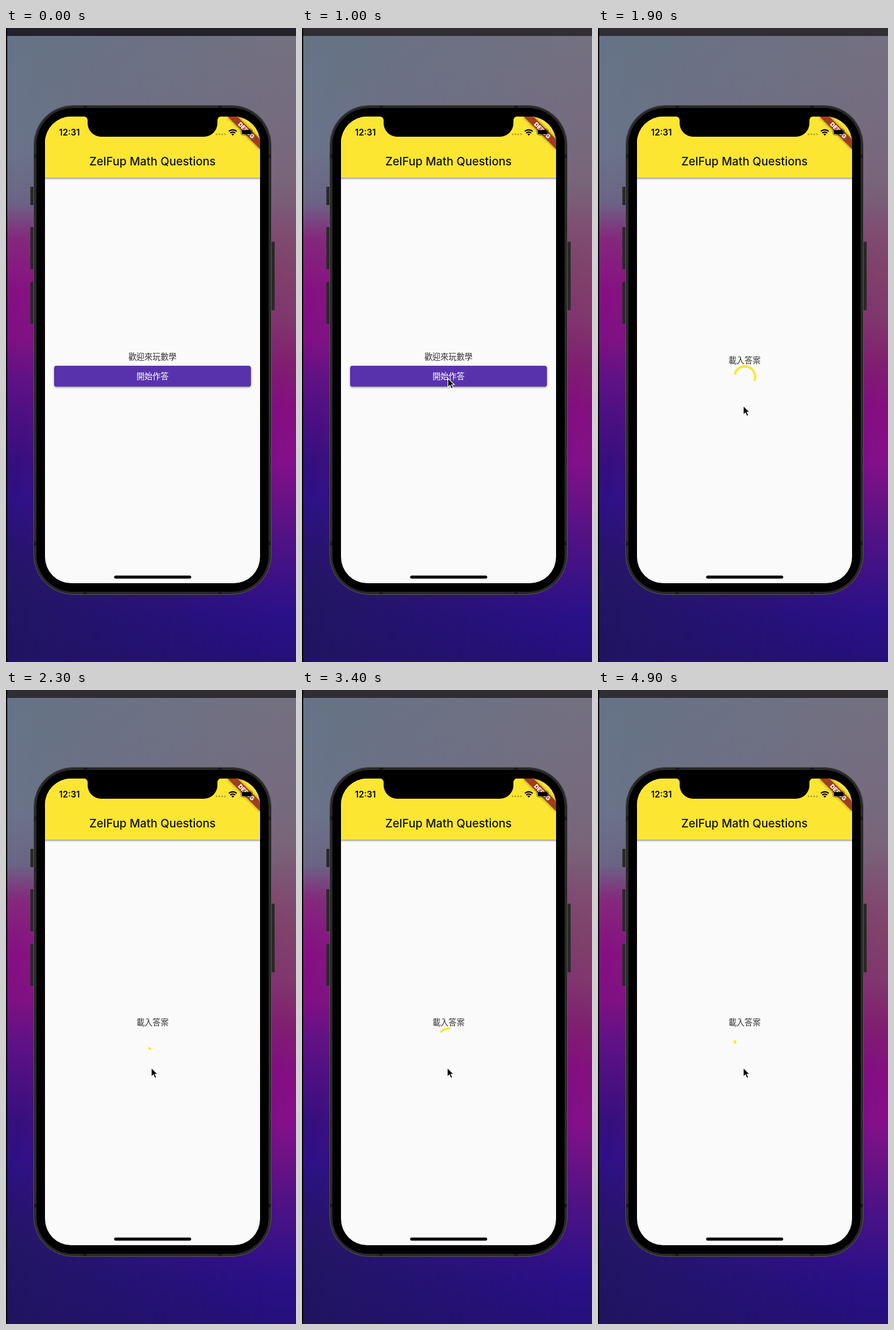
An HTML page that plays this animation: 476x1038 px, repeating every 5000 ms.

```html
<!DOCTYPE html>
<html lang="zh-Hant">
<head>
<meta charset="utf-8">
<title>Math quiz loading screen</title>
<style>
  html, body { margin: 0; width: 100%; height: 100%; overflow: hidden; background: #000; }
  .wall, .wall::after, svg { position: absolute; left: 0; top: 0; width: 476px; height: 1038px; }
  .wall {
    background: linear-gradient(#667386 13px, #6a7389 200px, #6b6585 285px, #85287c 345px,
      #861083 430px, #801085 510px, #5f1286 570px, #4a1083 630px, #30107e 710px,
      #2a1187 770px, #241470 840px, #211760 920px, #20145c 1038px);
  }
  .wall::after {
    content: "";
    background: linear-gradient(#75707f 13px, #776b7e 150px, #7a6478 250px, #7e5070 330px,
      #7f4468 400px, #803a6c 470px, #80206f 550px, #850f80 620px, #84108a 710px,
      #6b1285 770px, #521285 830px, #3f1286 890px, #2a1089 960px, #25107a 1038px);
    -webkit-mask-image: linear-gradient(95deg, transparent 8%, #000 92%);
    mask-image: linear-gradient(95deg, transparent 8%, #000 92%);
  }
  text { font-family: Inter, "Noto Sans CJK TC", "Noto Sans CJK", sans-serif; }
  .label { font: 13.2px "Noto Sans CJK TC", "Noto Sans CJK", sans-serif; text-anchor: middle; fill: #333; }
</style>
</head>
<body>
<div class="wall"></div>
<svg viewBox="0 0 476 1038">
  <defs>
    <clipPath id="screen"><rect x="64" y="145" width="353" height="764" rx="43"/></clipPath>
    <filter id="soft" x="-20%" y="-50%" width="140%" height="220%">
      <feDropShadow dx="0" dy="1.5" stdDeviation="1.6" flood-opacity=".45"/>
    </filter>
    <filter id="blur" x="-30%" y="-100%" width="160%" height="300%"><feGaussianBlur stdDeviation="2.8"/></filter>
  </defs>

  <rect id="titleBar" width="476" height="13"/>
  <rect width="2" height="1038" fill="#000"/>

  <!-- phone body -->
  <path d="M40 260h6v30h-6zM40 326h6v69h-6zM40 416h6v68h-6zM435 350h6v112h-6z" fill="#292929"/>
  <rect x="45.5" y="126.5" width="390" height="801" rx="65" fill="#292929" stroke="#565656"/>
  <path d="M127 127h6v4h-6zM348 127h6v4h-6zM127 923h6v4h-6zM348 923h6v4h-6zM46 207h4v6h-4zM431 207h4v6h-4zM46 841h4v6h-4zM431 841h4v6h-4z" fill="#1a1a1a"/>
  <rect x="50" y="131" width="381" height="792" rx="60" fill="#000"/>

  <g clip-path="url(#screen)">
    <rect x="64" y="145" width="353" height="764" fill="#fafafa"/>
    <rect x="54" y="135" width="373" height="110" fill="#fde632" filter="url(#soft)"/>
    <text x="240.5" y="225" font-size="18.8" font-weight="500" text-anchor="middle" fill="#111">ZelFup Math Questions</text>

    <g transform="translate(417 145) rotate(45)">
      <rect x="-37.6" y="26.3" width="75.2" height="11.3" opacity=".5" filter="url(#blur)"/>
      <rect x="-37.6" y="26.3" width="75.2" height="11.3" fill="#a23d1c"/>
      <text y="35.4" font-size="9.6" font-weight="900" text-anchor="middle" fill="#fff">DEBUG</text>
    </g>

    <text x="87" y="176" font-size="14.1" font-weight="600">12:31</text>
    <g fill="#000">
      <path d="M345.8 174h.01m4.5 0h.01m4.5 0h.01m4.5 0h.01" stroke="#000" stroke-width="3" stroke-linecap="round" opacity=".27"/>
      <g fill="none" stroke="#000" stroke-width="2.1">
        <path d="M365.8 169.2a9.3 9.3 0 0 1 12.8 0M368.2 172a5.8 5.8 0 0 1 8 0"/>
      </g>
      <path d="M372.2 176.2l-2.2-2.4a3.2 3.2 0 0 1 4.4 0z"/>
      <rect x="385.5" y="165.5" width="19" height="10" rx="2.8" fill="none" stroke="#000" stroke-opacity=".4"/>
      <rect x="387" y="167" width="16" height="7" rx="1.5"/>
    </g>

    <path d="M128 144.9a6 6 0 0 1 6 6v5a22 22 0 0 0 22 22h169a22 22 0 0 0 22-22v-5a6 6 0 0 1 6-6z"/>

    <g id="welcome">
      <text class="label" x="240.5" y="543">歡迎來玩數學</text>
      <rect x="79" y="553" width="323" height="34" rx="3.8" fill="#5930ac" filter="url(#soft)"/>
      <text class="label" x="240.5" y="575" style="fill:#fff;font-weight:500">開始作答</text>
    </g>
    <g id="loading">
      <text class="label" x="240.5" y="549">載入答案</text>
      <path id="spinner" fill="none" stroke="#fde632" stroke-width="3.77" stroke-linecap="square"/>
    </g>
    <rect x="177.5" y="896.5" width="126.5" height="5" rx="2.5"/>
  </g>

  <path id="cursor" d="M0 0V14.6L3.4 11.5L5.8 17L8.5 15.8L6.1 10.5H10.6Z" stroke="#fff" stroke-width="1.1"/>
</svg>

<script>
const LOOP = 5000, STEP = 100;
const FOCUS_AT = 700, LOADING_AT = 1100, SPIN_START = 1040;
const $ = id => document.getElementById(id);
const clamp = v => Math.min(1, Math.max(0, v));
const show = (id, on) => $(id).setAttribute("visibility", on ? "visible" : "hidden");

// Cubic Bézier easing (0.4, 0, 0.2, 1)
function fastOutSlowIn(x) {
  if (x <= 0 || x >= 1) return clamp(x);
  let lo = 0, hi = 1, u;
  for (let i = 0; i < 24; i++) {
    u = (lo + hi) / 2;
    const bx = 1.2 * u * (1 - u) ** 2 + 0.6 * u * u * (1 - u) + u ** 3;
    if (bx < x) lo = u; else hi = u;
  }
  return u * u * (3 - 2 * u);
}

// Head grows for half a cycle, then the tail catches up, while the whole arc rotates
function spinnerPath(elapsed) {
  const cx = 241, cy = 571, r = 16.95;
  const phase = elapsed / 1333 % 1, turn = elapsed / 2222 % 1;
  const head = fastOutSlowIn(clamp(phase * 2));
  const tail = fastOutSlowIn(clamp(phase * 2 - 1));
  const start = Math.PI * (-0.5 + tail * 1.5 + turn * 2 + phase * 0.5);
  const sweep = Math.max((head - tail) * 1.5 * Math.PI, 0.01);
  const point = a => `${cx + r * Math.cos(a)} ${cy + r * Math.sin(a)}`;
  return `M${point(start)}A${r} ${r} 0 ${+(sweep > Math.PI)} 1 ${point(start + sweep)}`;
}

// Pointer stops: time, x, y
const stops = [[700, 250, 612], [900, 239.5, 573.5], [1200, 239.5, 573.5],
               [1400, 238.5, 585.5], [1800, 238.5, 618.5], [LOOP, 238.5, 618.5]];

function cursorAt(t) {
  const i = Math.max(1, stops.findIndex(s => s[0] > t));
  const [t0, x0, y0] = stops[i - 1], [t1, x1, y1] = stops[i];
  const k = clamp((t - t0) / (t1 - t0));
  return [x0 + (x1 - x0) * k, y0 + (y1 - y0) * k];
}

function render(now) {
  const t = Math.floor(now % LOOP / STEP) * STEP;
  const loading = t >= LOADING_AT;
  $("titleBar").setAttribute("fill", t < FOCUS_AT ? "#23222b" : "#302d33");
  show("welcome", !loading);
  show("loading", loading);
  show("cursor", t >= FOCUS_AT);
  $("cursor").setAttribute("transform", `translate(${cursorAt(t)})`);
  if (loading) $("spinner").setAttribute("d", spinnerPath(t - SPIN_START));
}

const begin = performance.now();
function tick() {
  render(performance.now() - begin);
  requestAnimationFrame(tick);
}
tick();
</script>
</body>
</html>
```
